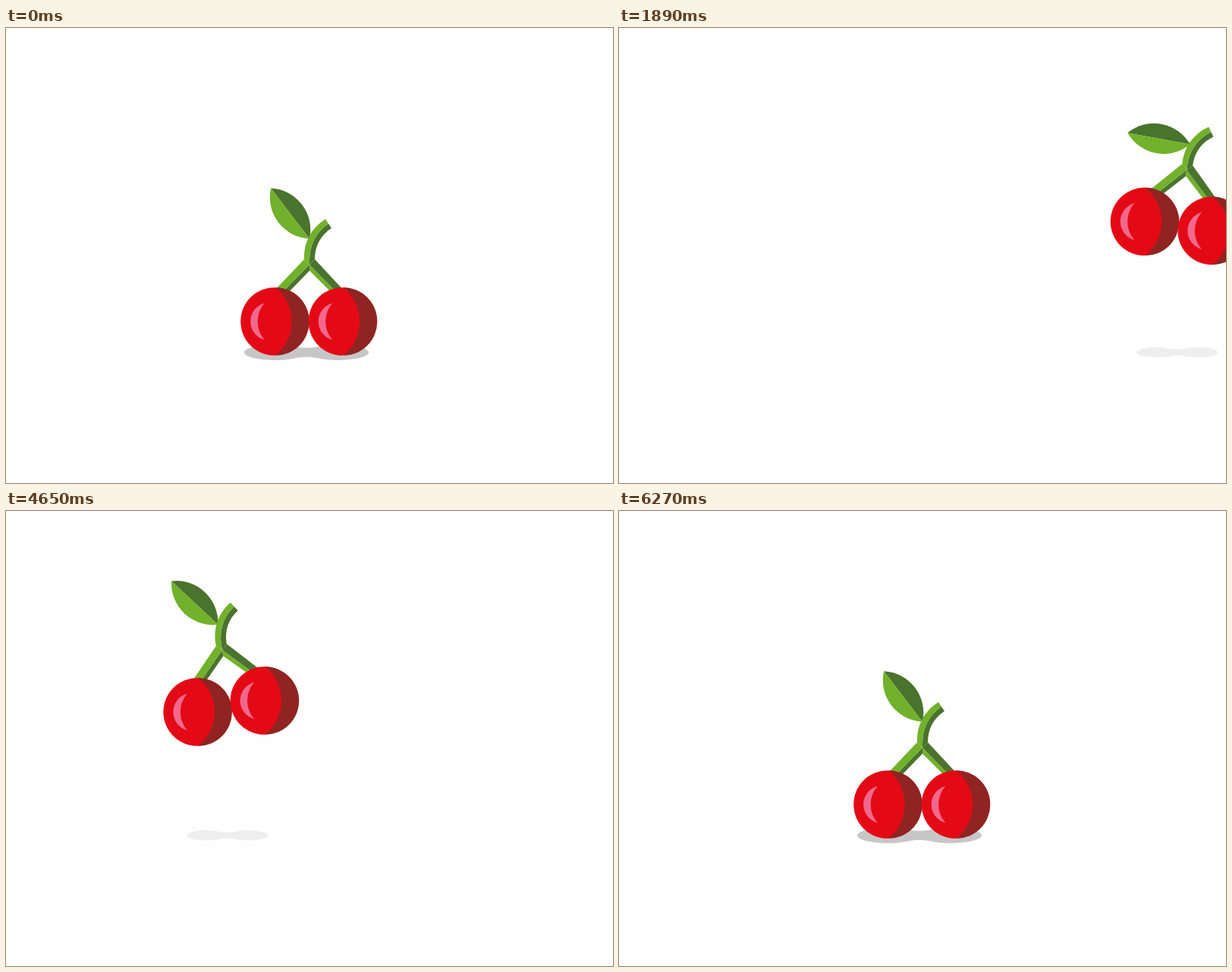
Animation, 800 px wide and 600 px high, one loop 6.3 s. Source, as an HTML page:

```html
<!DOCTYPE html>
<html lang="en">
<head>
<meta charset="utf-8">
<title>Flying cherries</title>
<style>
  html, body { margin: 0; width: 100%; height: 100%; overflow: hidden; background: #fefefe; }
  svg { display: block; width: 800px; height: 600px; }
  .light { fill: #72b12b; }
  .dark { fill: #4a732d; }
</style>
</head>
<body>
<svg viewBox="0 0 800 600">
  <defs>
    <g id="cherry">
      <circle r="44.8" fill="#e30a16"/>
      <path d="M1 -44.8A44.8 44.8 0 0 1 1 44.8A57.2 57.2 0 0 0 1 -44.8Z" fill="#8f2422"/>
      <path d="M-13.3 -24.3A25.2 25.2 0 0 0 -13.3 24.3A37 37 0 0 1 -13.3 -24.3Z" fill="#f2688c"/>
    </g>
  </defs>
  <path id="shadow" d="M-82 0C-82 -6 -62 -10.3 -41 -10.3C-20 -10.3 -14 -6 0 -6C14 -6 20 -10.3 41 -10.3C62 -10.3 82 -6 82 0C82 6 62 10.3 41 10.3C20 10.3 14 6 0 6C-14 6 -20 10.3 -41 10.3C-62 10.3 -82 6 -82 0Z"/>
  <g id="body">
    <g id="leaf">
      <path class="dark" d="M0 0A55 55 0 0 0 -84 0Z"/>
      <path class="light" d="M0 0A55 55 0 0 1 -84 0Z"/>
    </g>
    <path class="dark" d="M1 -75L-37 -36L-29 -36L1 -67Z"/>
    <path class="light" d="M1 -75L39 -36L32 -36L1 -67Z"/>
    <path class="dark" d="M1 -75L8 -82L47 -40L39 -36Z"/>
    <path class="light" d="M1 -75L-6 -82L-45 -41L-37 -36Z"/>
    <path class="dark" d="M1 -75L1 -80C1 -102 10 -118 26 -129L30 -123C16 -114 8 -100 8 -82Z"/>
    <path class="light" d="M1 -75L-6 -82C-7 -104 3 -123 22 -135L26 -129C10 -118 1 -102 1 -80Z"/>
    <use id="left" href="#cherry"/>
    <use id="right" href="#cherry"/>
  </g>
</svg>
<script>
const LOOP = 6300, STEP = 30;
const HOME = 399, GROUND = 387, PIVOT = 65;
const TURN = 2700;                    // off stage: leaves on the right, returns on the left
const SWING = 9.6, SWAY = 900, FLAP = 120;

const { PI, sin, cos } = Math;
const phase = (t, from, to) => Math.min(1, Math.max(0, (t - from) / (to - from)));
const easeOut = u => sin(u * PI / 2);
const easeInOut = u => (1 - cos(u * PI)) / 2;

// Steady flight out, decelerating glide home.
const travel = t => t < TURN
  ? HOME + 0.2925 * Math.max(0, t - 704)
  : HOME - 471 * (Math.max(0, 5397 - t) / 2067) ** 1.4;

// Lean in, sway in the air, straighten up for landing.
function tiltAt(t) {
  if (t < 900) return SWING * (t / 900) ** 1.65;
  if (t > 5550) return SWING * (easeInOut(phase(t, 5550, 6000)) - 1);
  const peak = t < TURN ? 900 : 3300;
  return SWING * cos((t - peak) / SWAY * 2 * PI);
}

const falling = t => phase(t, 5510, 6100);
const liftAt = t => easeOut(phase(t, 690, 1377)) - easeInOut(falling(t));

// The leaf beats like a wing in flight and is pushed up by the fall.
function flapAt(t) {
  if (t < 750 || t > 5490) return 4 * sin(falling(t) * PI);
  const start = t < TURN ? 750 : 3330;
  return -50 * easeInOut((t - start) / FLAP * 2);
}

const el = id => document.getElementById(id);
const move = (id, value) => el(id).setAttribute("transform", value);

function draw(t) {
  const x = travel(t), tilt = tiltAt(t), lift = liftAt(t);
  const y = GROUND - PIVOT - lift * (t < TURN ? 125 : 128.6);
  const fade = lift ** 1.2;
  const shadowX = x - PIVOT * sin(tilt * PI / 180) - 3 + 0.2 * tilt;

  move("body", `translate(${x} ${y}) rotate(${tilt}) translate(0 ${PIVOT})`);
  move("leaf", `translate(1 -109) rotate(${52.7 + flapAt(t)})`);
  move("left", `translate(-45 0) rotate(${-tilt})`);
  move("right", `translate(44.5 0) rotate(${-tilt})`);
  move("shadow", `translate(${shadowX} 427.7) scale(${1 - 0.348 * fade})`);
  el("shadow").setAttribute("fill-opacity", 0.22 - 0.157 * fade);
}

const begin = performance.now();
function tick() {
  const t = (performance.now() - begin) % LOOP;
  draw(Math.floor(t / STEP) * STEP);
  requestAnimationFrame(tick);
}
tick();
</script>
</body>
</html>
```
